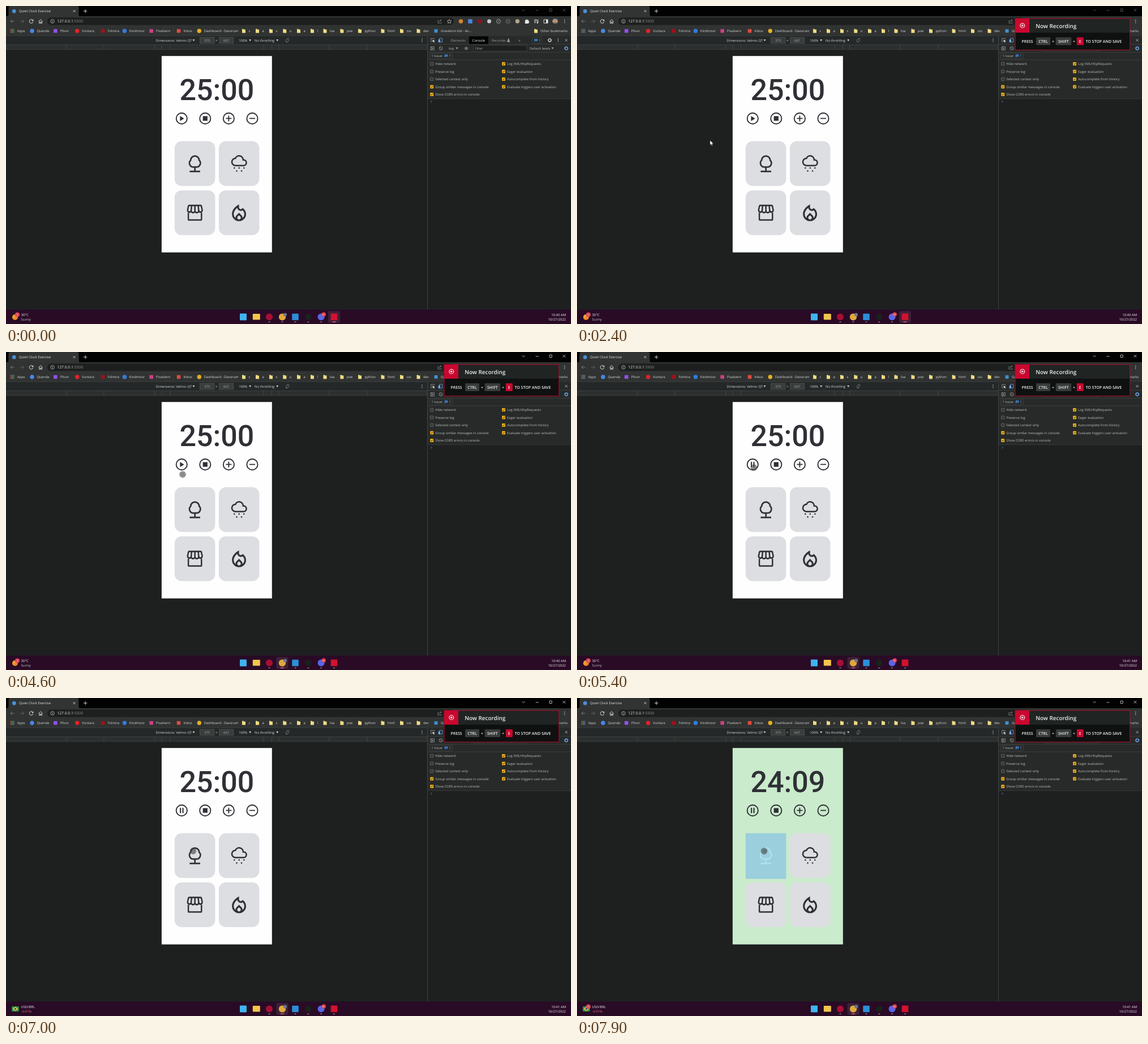
An HTML page for the animation above (8000 ms loop, 998x561 px).

```html
<!DOCTYPE html>
<html lang="en">
<head>
<meta charset="utf-8">
<title>Focus timer session</title>
<style>
html, body { margin: 0; width: 100%; height: 100%; overflow: hidden; background: #1e2020; }
svg { display: block; width: 998px; height: 561px; }
text { font-family: "Open Sans", "Noto Sans", sans-serif; text-rendering: geometricPrecision; white-space: pre; }
</style>
</head>
<body>
<svg id="stage" viewBox="0 0 998 561" xmlns="http://www.w3.org/2000/svg"></svg>
<script>
const stage = document.getElementById('stage');
const LOOP = 8000, STEP = 100;
const INK = '#2f3036', PALE = '#d4d6d5', GREY = '#9a9e9d', BLUE = '#6fa8ee';

// ---- markup helpers ----
const rect = (x, y, w, h, fill, more = '') => `<rect x="${x}" y="${y}" width="${w}" height="${h}" fill="${fill}" ${more}/>`;
const dot = (x, y, r, fill, more = '') => `<circle cx="${x}" cy="${y}" r="${r}" fill="${fill}" ${more}/>`;
const ring = (x, y, r, color, w = 0.8) => dot(x, y, r, 'none', `stroke="${color}" stroke-width="${w}"`);
const line = (d, color, w = 0.8, more = '') => `<path d="${d}" fill="none" stroke="${color}" stroke-width="${w}" ${more}/>`;
const fill = (d, color, more = '') => `<path d="${d}" fill="${color}" ${more}/>`;
const text = (x, y, s, size = 5.9, color = PALE, more = '') => `<text x="${x}" y="${y}" font-size="${size}" fill="${color}" ${more}>${s}</text>`;
const group = (id, body, more = '') => `<g id="${id}" ${more}>${body}</g>`;
const square = (x, y, s, color, r = 1) => rect(x - s / 2, y - s / 2, s, s, color, `rx="${r}"`);
const caret = (x, y, color = PALE) => fill(`M${x - 2} ${y - 1.5}h4l-2 3.4z`, color);
const dots = (x, y, color = PALE) => [-2.5, 0, 2.5].map(d => dot(x, y + d, 0.7, color)).join('');
const cross = (x, y, r, color, w = 0.8) => line(`M${x - r} ${y - r}l${2 * r} ${2 * r}m0 ${-2 * r}l${-2 * r} ${2 * r}`, color, w);
const folder = (x, y) => fill(`M${x - 3} ${y - 3.6}h2.4l.8 1h2.8v6.2h-6z`, '#f1dc83');
const gear = (x, y, color) => ring(x, y, 2.3, color, 1.1) + dot(x, y, 3.3, 'none', `stroke="${color}" stroke-width="1" stroke-dasharray="1.3 1.29"`);
const bubble = (x, y) => fill(`M${x - 2.6} ${y - 2.4}h5.4v4h-4l-1.4 1.4z`, '#3f8ae0') + line(`M${x - 1.4} ${y - 1}h3m-3 1.4h3`, '#1e2b3a', 0.5);

function tabStrip() {
  return rect(0, 0, 998, 18, '#010201') +
    fill('M2 18q2.5 0 2.5-3V3q0-3 3-3h118q3 0 3 3v12q0 3 2.5 3z', '#313433') +
    dot(14.3, 9.2, 3.4, '#4a90d9') +
    text(23, 11.1, 'Quiet Clock Exercise', 6, '#e6e8e7') +
    cross(120.5, 9, 1.9, '#e0e2e1') +
    line('M137 9h6.4M140.2 5.8v6.4', '#e0e2e1', 0.9);
}

function windowButtons() {
  return line('M911.7 6.2l2.4 2.4 2.4-2.4M935.6 7.8h5M960 5.2h4.2v4.2h-4.2zM983.6 5l4.6 4.6m0-4.6l-4.6 4.6', 'currentColor', 0.8);
}

function addressBar() {
  const icons = dot(803.5, 27, 3.8, '#d9822b') + square(820, 27, 7.6, '#4a86d8') +
    square(837, 27, 7, '#8d1420', 2) + dot(853.5, 27, 3.5, '#c9cbca') +
    ring(870, 27, 3.5, '#b5b8b7') + line('M868.4 28.6l3.2-3.2', '#b5b8b7') +
    ring(886.7, 27, 3.5, '#858988') + line('M885 27h3.4', '#858988') +
    dot(903.3, 27, 3.7, '#b3a58e') +
    fill('M916.8 24.7h2a1.2 1.2 0 1 1 2.4 0h2v2.2a1.2 1.2 0 1 1 0 2.4v1.6h-6.4z', '#e4e6e5') +
    line('M933 24.4h5.4M933 26.8h5.4M933 29.2h3M939.7 24v5.2', '#e4e6e5', 1) + dot(938.8, 29.5, 1.2, '#e4e6e5') +
    line('M950 24h7v6.2h-7z', '#e4e6e5', 0.9) + rect(954, 24, 3, 6, '#e4e6e5') +
    dot(970, 27, 4.8, 'url(#avatar)') + dots(986.7, 27);
  return rect(0, 18, 998, 34, '#303332') +
    rect(73, 20.4, 718, 13.2, '#1d1f1f', 'rx="6.6"') +
    line('M14.6 27h-6.4m2.8-3l-3 3 3 3', '#858988') +
    line('M25 27h6.4m-2.8-3l3 3-3 3', '#696d6c') +
    line('M47.4 25.3a3.3 3.3 0 1 0 .4 2.6', '#e0e2e1', 1) + fill('M48.4 23.4v3.2h-3.2z', '#e0e2e1') +
    line('M57.6 27.2l3.5-3.4 3.5 3.4M58.8 26.4v4.2h1.6v-2.5h1.5v2.5h1.6v-4.2', '#e0e2e1', 0.9) +
    ring(82, 27, 3.3, PALE, 0.7) + line('M82 26.4v2.4M82 24.8v.8', PALE, 0.8) +
    text(90.3, 29.4, '127.0.0.1<tspan fill="#8f9392">:5500</tspan>', 6.75, '#eceeed') +
    line('M764 25.5h-1v4.7h6v-1.6M765 28.2q.3-3 3.6-3m-1.4-1.6l1.7 1.6-1.7 1.6', GREY, 0.7) +
    line('M783 23.5l1.1 2.4 2.6.2-2 1.8.7 2.6-2.4-1.4-2.4 1.4.7-2.6-2-1.8 2.6-.2z', PALE, 0.7) + icons;
}

function bookmarks() {
  let out = '';
  for (let i = 0; i < 9; i++) out += square(8.6 + i % 3 * 2.5, 41.4 + Math.floor(i / 3) * 2.5, 1.6, ['#e0604f', '#6fae62', '#5f93dd'][i % 3], 0);
  const sites = [['Quenda', 46, '#4a86e8', 1], ['Plivor', 87.3, '#9350f0'], ['Vuntara', 125.7, '#e6212b', 1],
    ['Folmira', 171, '#a50f17'], ['Kindmoor', 209.4, '#2f7de1', 1], ['Pixalvern', 256.7, '#cf3f83'],
    ['Inbox', 305, '#dd4b3e'], ['Dashboard - Daxorum', 341.3, '#e4b01f', 1]];
  out += text(19.8, 46.1, 'Apps');
  for (const [name, x, color, round] of sites)
    out += (round ? dot(x, 44, 3.7, color) : square(x, 44, 6.6, color)) + text(x + 8.4, 46.1, name);
  const dirs = { c1: 420, a1: 444, s1: 468, u1: 492.3, a2: 517, l1: 541, loa: 563.5, poe: 593.4, python: 625, html: 665.5, css: 699, dev: 728.5 };
  for (const k in dirs) out += folder(dirs[k], 44) + text(dirs[k] + 8.5, 46.1, k.replace(/\d/, ''));
  return out + square(759.5, 44, 6, '#3e8fd0') + text(768, 46.1, 'Gravelorn Kid - An...') +
    folder(936, 44) + text(944, 46.1, 'Other bookmarks', 5.85);
}

function deviceBar() {
  const marks = [1, 107, 173, 263, 275, 289.5, 455, 469.5, 482, 571, 638, 744];
  let out = rect(0, 52, 744, 16, '#252828') + rect(0, 52, 998, 0.8, '#3d4140');
  for (let i = 0; i < marks.length - 1; i++)
    out += rect(marks[i], 68.4, marks[i + 1] - marks[i], 8.4, '#2c2f2f', 'stroke="#454948" stroke-width=".7"');
  for (const [x, s] of [[342.5, '375'], [376.3, '667']])
    out += rect(x, 55.2, 25.5, 10.8, '#393d3c', 'stroke="#565a59" stroke-width=".6"') +
      text(x + 12.8, 62.8, s, 5.9, '#a9adac', 'text-anchor="middle"');
  return out + text(264.6, 62.8, 'Dimensions: Velmio QT') + caret(331.5, 60.4) + text(370, 62.8, '×') +
    text(411.2, 62.8, '100%') + caret(431.2, 60.4) + text(439, 62.8, 'No throttling') + caret(479.2, 60.4) +
    line('M494.2 60.4l2.6-2.7 3 3-2.6 2.7zM493.8 62.4q.8 1.8 2.8 1.7M500.2 58.6q-.8-1.8-2.8-1.7', GREY, 0.7) +
    dots(735, 60.4);
}

function check(x, y, on, label) {
  const box = on
    ? rect(x, y - 3, 6, 6, '#efb11c', 'rx="1"') + line(`M${x + 1.3} ${y}l1.3 1.4 2.3-2.9`, '#26221a', 0.9)
    : rect(x + 0.3, y - 2.7, 5.4, 5.4, '#323635', 'rx="1" stroke="#858988" stroke-width=".6"');
  return box + text(x + 9, y + 2.1, label, 5.85, '#b9bdbc');
}

function devtools() {
  let out = rect(744, 52.8, 254, 483, '#1e2020') + rect(744, 52.8, 254, 110, '#272a29') +
    rect(744, 53, 0.8, 483, '#484c4b') + rect(818, 53.6, 34, 14, '#020303');
  for (const y of [67.3, 81.4, 94.6, 162.9]) out += rect(744, y, 254, 0.7, '#434746');
  out += line('M756.6 58.8v-1.6h-6v6h1.8', GREY) + fill('M753.2 59.4l4.6 1.9-2 .7 1.5 1.7-.8.7-1.5-1.7-.9 1.7z', PALE) +
    line('M765.4 57h5.2v6.6h-5.2z', BLUE) + rect(763.6, 59.2, 3.4, 5, BLUE) +
    text(786, 62.8, 'Elements', 6, GREY) + text(823.6, 62.8, 'Console', 6, '#f2f4f3') + text(858, 62.8, 'Recorder', 6, GREY) +
    fill('M886.6 57.4h2v2.2l1.8 4h-5.6l1.8-4z', GREY) + text(905, 62.9, '»', 7.5, GREY) +
    rect(929.5, 55, 17.5, 11, 'none', 'rx="1" stroke="#4a4e4d" stroke-width=".6"') + bubble(936, 60.4) + text(941, 62.6, '1', 5.9, BLUE) +
    gear(960.5, 60.3, PALE) + dots(975.4, 60.3) + cross(989.6, 60.4, 2, PALE);
  out += line('M750 71.8h6.4v6h-6.4zM751.9 72v6', GREY) + fill('M753 73.2l2.2 1.6-2.2 1.6z', GREY) +
    ring(768, 74.7, 3, GREY) + line('M765.9 72.6l4.2 4.2', GREY) +
    text(782, 76.9, 'top', 5.9, '#b9bdbc') + caret(796.5, 74.6, GREY) +
    line('M809.5 74.7q3.5-4.6 7 0q-3.5 4.6-7 0z', GREY) + dot(813, 74.7, 1.3, GREY) +
    rect(825.8, 69.5, 94, 10.2, '#1d1f1f', 'stroke="#4a4e4d" stroke-width=".6"') + text(828.5, 77, 'Filter', 5.9, '#a4a8a7') +
    text(925, 76.9, 'Default levels', 5.85, '#b9bdbc') + caret(965.5, 74.6, GREY) + gear(989.6, 74.7, BLUE) +
    rect(748.5, 83.2, 40, 10, 'none', 'rx="1" stroke="#4a4e4d" stroke-width=".6"') +
    text(751.2, 90.2, '1 Issue:', 5.9, '#b9bdbc') + bubble(777.4, 88) + text(782.2, 90.2, '1', 5.9, BLUE);
  ['Hide network', 'Preserve log', 'Selected context only', 'Group similar messages in console', 'Show CORS errors in console']
    .forEach((s, i) => out += check(749.2, 102 + i * 13.5, i > 2, s));
  ['Log XMLHttpRequests', 'Eager evaluation', 'Autocomplete from history', 'Evaluate triggers user activation']
    .forEach((s, i) => out += check(876, 102 + i * 13.5, true, s));
  return out + line('M750.4 166.8l1.7 1.8-1.7 1.8', '#4d8be0', 0.9);
}

// Tile icons live in a 24-unit box centred on x.
const icon = (id, x, y, sx, sy, body) =>
  group(id, body, `transform="translate(${x - 12 * sx} ${y}) scale(${sx} ${sy})" color="${INK}"`);

function tileIcons() {
  const tree = line('M10 16A4.5 4.5 0 0 1 7.2 8.2A4.8 4.8 0 0 1 16.8 8.2A4.5 4.5 0 0 1 14 16ZM12 16V21M6 21H18', 'currentColor', 1.7);
  let rain = line('M7.5 14A4.5 4.5 0 0 1 7.4 5A5 5 0 0 1 17 7H17.5A3.5 3.5 0 0 1 17.5 14Z', INK, 1.8);
  for (const x of [6, 12, 18]) rain += dot(x, 17, 0.95, INK);
  for (const x of [9, 15]) rain += dot(x, 20.7, 0.95, INK);
  const store = line('M5.05 4H18.9Q19.7 4 19.9 4.8L20.9 9.1A2.2 2.2 0 0 1 16.6 9.7A2.25 2.25 0 0 1 12 9.7A2.25 2.25 0 0 1 7.4 9.7A2.2 2.2 0 0 1 3.1 9.1L4.1 4.8Q4.3 4 5.05 4ZM8 4L7.4 9.7M12 4V9.7M16 4L16.6 9.7M4 12V19Q4 20 5 20H19Q20 20 20 19V12', INK, 1.7);
  const fire = fill('M16 6l-.44.55C14.38 8.02 12 7.19 12 5.3V2C12 2 4 6 4 13A8 8 0 0 0 20 13C20 10.04 18.39 7.38 16 6ZM12 19C10.9 19 10 18.13 10 17.06Q10 16.25 10.58 15.7L12 14.3L13.43 15.7Q14 16.25 14 17.06C14 18.13 13.1 19 12 19ZM15.96 17.5C16 17.14 16.18 15.61 14.83 14.28L12 11.5L9.17 14.28C7.81 15.62 8 17.16 8.04 17.5C6.79 16.4 6 14.79 6 13C6 9.84 8.13 7.35 10.03 5.75A4 4 0 0 0 16.2 8.64C17.34 9.78 18 11.35 18 13C18 14.79 17.21 16.4 15.96 17.5Z', INK, 'fill-rule="evenodd"');
  return icon('tree', 333.7, 259.3, 1.55, 1.55, tree) + icon('rain', 411.8, 261.6, 1.42, 1.42, rain) +
    icon('store', 333.7, 345.5, 1.45, 1.6, store) + icon('fire', 411.6, 347, 1.55, 1.55, fire);
}

function phonePage() {
  let out = rect(274.9, 88.2, 194.9, 346.5, '#fefefe', 'id="sheet"') +
    text(372.4, 166.2, '25:00', 52, INK, 'id="clock" text-anchor="middle" style="font-family:Roboto,sans-serif;font-weight:500"');
  for (const x of [310.3, 351.8, 393.4, 435]) out += ring(x, 198.4, 9.6, INK, 1.9);
  out += group('play', fill('M307.4 194v8.9l7.2-4.45z', INK)) +
    group('pause', rect(307.1, 193.7, 2.1, 9.4, INK) + rect(311.5, 193.7, 2.1, 9.4, INK)) +
    rect(347.7, 194.3, 8.2, 8.2, INK) + line('M388.4 198.4h10m-5-5v10M430 198.4h10', INK, 1.9);
  for (const [id, x, y] of [['tile', 297.8, 238.5], ['b', 375.9, 238.5], ['c', 297.8, 325.2], ['d', 375.9, 325.2]])
    out += rect(x, y, 71.6, 79, '#dddee2', `id="${id}" rx="12.5"`);
  return out + tileIcons();
}

function taskbar() {
  let out = rect(0, 535.6, 998, 25.4, '#290b26') +
    rect(0, 0, 21, 20.5, '#ffffff', 'id="active" rx="2" fill-opacity=".09"');
  out += square(419, 548.4, 12, '#3fb4ee') + rect(435.8, 543, 13, 10.6, '#f3c64a', 'rx="1"') +
    dot(465, 548.4, 6, '#a80f33') + dot(488, 548.6, 6.2, '#e0a93a') + dot(493, 544.4, 3, '#6d7890') +
    square(511, 548.4, 11.5, '#2a8fd8') + dot(533.8, 548.4, 5.4, '#18231c') +
    dot(556.6, 548.4, 6, '#5865e8') + dot(561.2, 544, 3.7, '#e0404c') + text(561.2, 545.6, '9+', 4.2, '#fff', 'text-anchor="middle"') +
    square(579.5, 548.4, 11.6, '#d2122e');
  for (const x of [465, 488, 511, 533.8, 556.6, 579.5]) out += rect(x - 1.5, 556.8, 3, 1.2, '#a79aa6', 'rx=".6"');
  out += rect(0, 556.8, 7, 1.2, '#e0606c', 'id="mark" rx=".6"');
  return out +
    group('weather', dot(16, 549, 5, 'url(#sun)') + text(26.5, 547.2, '30°C', 6.1, '#f3eef2') + text(26.5, 555.4, 'Sunny', 6, '#c9bfc8')) +
    group('rate', rect(10.3, 544, 12.4, 9, '#2c9a48', 'rx="1"') + fill('M11.6 548.5l4.9-3.4 4.9 3.4-4.9 3.4z', '#f2cf3a') + dot(16.5, 548.5, 1.7, '#2a4b95') +
      text(26.5, 547.2, 'USD/BRL', 5.9, '#f3eef2') + text(26.5, 555.4, '-0.91%', 5.9, '#e8707c')) +
    group('badge', dot(20, 544.6, 4.1, '#d8485a') + text(20, 546.5, '1', 5.2, '#fff', 'text-anchor="middle"')) +
    text(989, 547, '10:40 AM', 5.95, '#f3eef2', 'id="time" text-anchor="end"') +
    text(989, 555.3, '10/27/2022', 5.95, '#f3eef2', 'text-anchor="end"');
}

function notice() {
  const bold = 'font-weight="600"', mid = bold + ' text-anchor="middle"';
  let out = rect(773.8, 21.8, 203, 56, '#0f1111') + rect(774, 22, 202.6, 25, '#202423') +
    rect(774, 22, 25, 25, '#c9082f') + ring(786.8, 34.4, 3.9, '#fff', 1.1) + dot(786.8, 34.4, 1.7, '#fff') +
    text(810.3, 38.8, 'Now Recording', 9.9, '#eef0ef', bold) + text(785.6, 64.7, 'PRESS', 6.9, '#eef0ef', bold);
  for (const [x, w, s, color] of [[811, 25, 'CTRL', '#383c3b'], [845.6, 27.6, 'SHIFT', '#383c3b'], [882.8, 12, 'E', '#c9082f']])
    out += rect(x, 55.3, w, 13.8, color, 'rx="1"') + text(x + w / 2, 64.7, s, 6.9, '#eef0ef', mid);
  return out + text(841, 64.7, '+', 6.9, '#eef0ef', mid) + text(878, 64.7, '+', 6.9, '#eef0ef', mid) +
    text(898.4, 64.7, 'TO STOP AND SAVE', 7, '#eef0ef', bold) +
    rect(774, 22, 202.8, 55.6, 'none', 'stroke="#b80a2e" stroke-width="1"');
}

stage.innerHTML = `<defs>
  <linearGradient id="avatar" x2="0" y2="1"><stop stop-color="#6a86b4"/><stop offset=".55" stop-color="#d59a62"/><stop offset="1" stop-color="#394a68"/></linearGradient>
  <linearGradient id="sun" x2="1" y2="1"><stop stop-color="#f8b338"/><stop offset="1" stop-color="#e8711f"/></linearGradient>
  <radialGradient id="touch"><stop stop-color="#3c3c3c" stop-opacity=".62"/><stop offset=".8" stop-color="#3c3c3c" stop-opacity=".56"/><stop offset="1" stop-color="#3c3c3c" stop-opacity=".18"/></radialGradient>
  </defs>` + rect(0, 0, 998, 561, '#1e2020') + tabStrip() + group('buttons', windowButtons()) + addressBar() + bookmarks() +
  deviceBar() + devtools() + phonePage() + taskbar() + group('notice', notice()) +
  group('arrow', fill('M0 0v8.2l1.9-1.7 1.3 2.9 1.4-.6-1.3-2.8h2.6z', '#fff', 'stroke="#111" stroke-width=".4"')) +
  group('finger', dot(0, 0, 6.2, 'url(#touch)'));

// ---- motion ----
const $ = id => document.getElementById(id);
const show = (id, on) => $(id).setAttribute('visibility', on ? 'visible' : 'hidden');
const set = (id, attrs) => { for (const k in attrs) $(id).setAttribute(k, attrs[k]); };

// time, x, y
const PATH = [[1800, 758, 286], [2100, 430, 262], [2400, 235, 237], [2600, 181, 232], [3500, 181, 232],
  [3700, 140, 246], [4000, 150, 262], [4400, 296, 232], [4600, 312, 216], [4900, 312, 216], [5100, 312.5, 204],
  [5700, 312.5, 204], [6300, 330.5, 267], [6500, 330.5, 270], [LOOP, 330.5, 270]];

function pointer(t) {
  const i = PATH.findIndex(p => p[0] > t);
  if (i < 1) return null;
  const [t0, x0, y0] = PATH[i - 1], [t1, x1, y1] = PATH[i];
  const k = (t - t0) / (t1 - t0);
  return [x0 + (x1 - x0) * k, y0 + (y1 - y0) * k];
}

function draw(t) {
  const focused = t >= 3800, running = t >= 5300, rate = t >= 6700, picked = t >= 7900;
  show('notice', t >= 1200);
  set('buttons', { color: focused ? '#dfe1e0' : '#636766' });
  const app = focused ? 488 : 579.5;
  set('active', { x: app - 10.5, y: 538.2 });
  set('mark', { x: app - 3.5 });
  show('play', !running);
  show('pause', running);
  show('weather', !rate);
  show('rate', rate);
  show('badge', !rate || t >= 7200);
  $('time').textContent = t >= 5000 ? '10:41 AM' : '10:40 AM';
  $('clock').textContent = t >= 7500 ? '24:09' : '25:00';
  set('sheet', { fill: picked ? '#caebcc' : '#fefefe' });
  set('tile', { fill: picked ? '#9bcfdd' : '#dddee2', rx: picked ? 0 : 12.5, height: picked ? 80.6 : 79 });
  set('tree', { color: picked ? '#abe2ee' : INK });
  const p = pointer(t);
  const inside = p && p[0] > 275 && p[0] < 470 && p[1] > 88 && p[1] < 435;
  show('arrow', p && !inside);
  show('finger', inside);
  if (p) set(inside ? 'finger' : 'arrow', { transform: `translate(${p[0]} ${p[1]})` });
}

const start = performance.now();
function tick() {
  const t = (performance.now() - start) % LOOP;
  draw(Math.floor(t / STEP) * STEP);
  requestAnimationFrame(tick);
}
tick();
</script>
</body>
</html>
```
